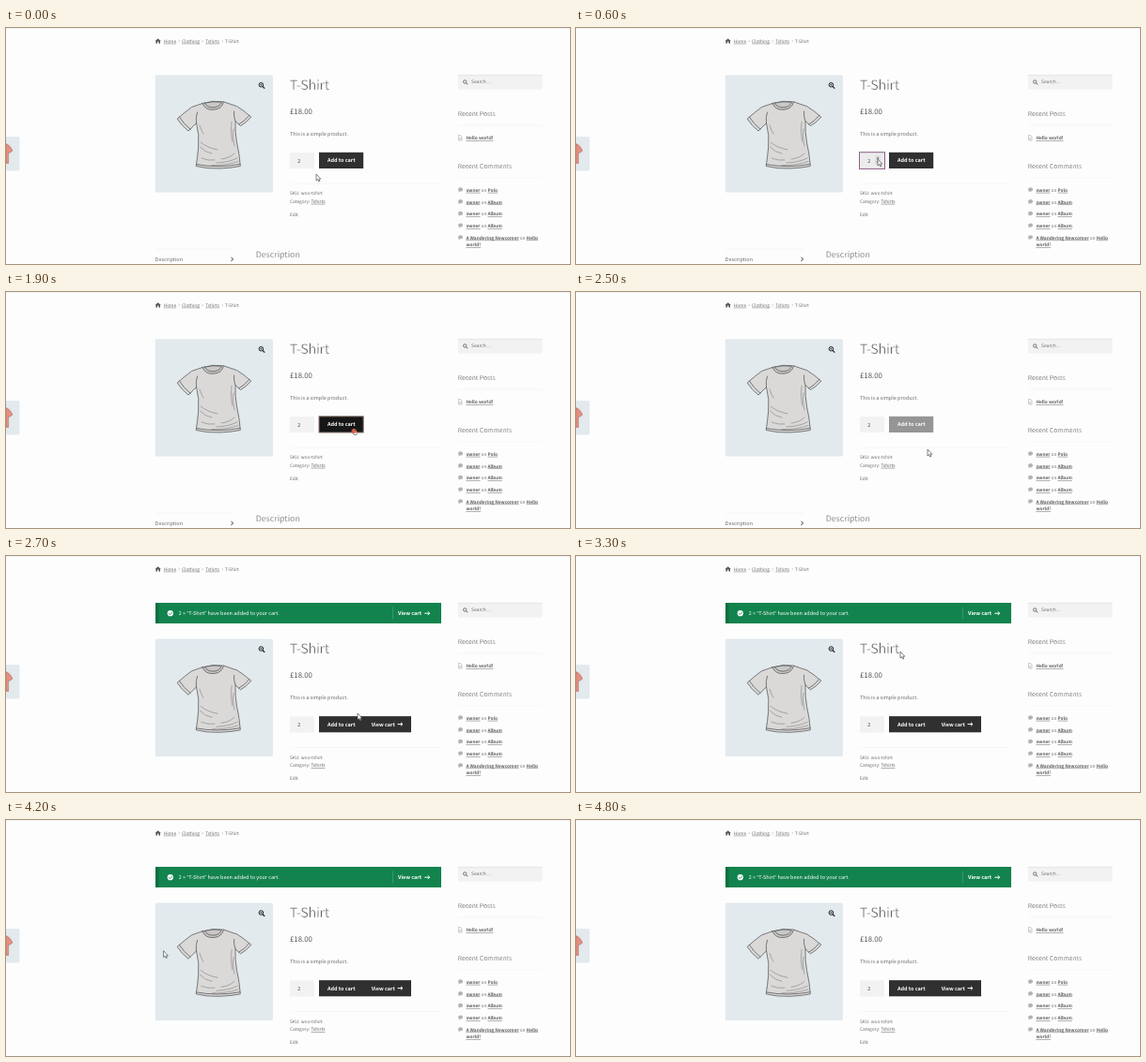
An HTML page that plays this animation: 600x252 px, repeating every 5 s.

```html
<!DOCTYPE html>
<html lang="en">
<head>
<meta charset="utf-8">
<title>Add to cart</title>
<style>
html, body { margin: 0; width: 100%; height: 100%; overflow: hidden; background: #fdfdfd; }
svg { display: block; width: 600px; height: 252px; }
text {
  font: 5.5px "Noto Sans CJK JP", "Noto Sans CJK SC", "Noto Sans CJK KR", "Noto Sans CJK", "Open Sans", sans-serif;
  fill: #6d6d6d; text-rendering: geometricPrecision; white-space: pre;
}
.small { font-size: 4.8px; }
/* a page-coloured outline thins the regular weight */
.light { fill: #555; stroke: #fdfdfd; stroke-width: .03em; }
.bold, .link { font-weight: 700; }
.white { fill: #fff; }
.link { fill: #5c5c5c; text-decoration: underline; }
.thin { font-weight: 400; }
.punct { font-family: Lato, "Open Sans", sans-serif; font-size: 5.3px; }
.rule { stroke: #f5f5f5; stroke-width: .8; }
.ink { fill: none; stroke: #555; stroke-width: .75; stroke-linecap: round; stroke-linejoin: round; }
.fold { stroke: #777; stroke-width: .55; }
</style>
</head>
<body>
<svg viewBox="0 0 600 252">
  <defs>
    <path id="bubble" d="M0 2.2C0-.7 5-.7 5 2.2C5 4 3 4.4 2 4.2L.6 5.2L.8 3.8Q0 3.2 0 2.2Z" fill="#b3b3b3"/>
    <path id="arrow" d="M0 0H5.4M3.5-1.8L5.4 0L3.5 1.8" fill="none" stroke="#fff"/>
  </defs>
  <rect width="600" height="252" fill="#fdfdfd"/>
  <rect width="600" height="1" fill="#f3f3f3"/>

  <!-- breadcrumbs -->
  <path d="M158.6 14L161.7 11.2L164.8 14H164V16.6H162.4V14.6H161V16.6H159.4V14Z" fill="#555"/>
  <text class="small" x="167.7" y="15.7" text-decoration="underline">Home</text>
  <text class="small" x="187" y="15.7" text-decoration="underline">Clothing</text>
  <text class="small" x="212.2" y="15.7" text-decoration="underline">Tshirts</text>
  <text class="small" x="233" y="15.7">T-Shirt</text>
  <path d="M183.6 12.7l1.2 1.3l-1.2 1.3M208.6 12.7l1.2 1.3l-1.2 1.3M229.6 12.7l1.2 1.3l-1.2 1.3" fill="none" stroke="#bbb" stroke-width=".6"/>

  <!-- neighbouring product -->
  <rect x="-10" y="116" width="24.5" height="36.5" rx="2" fill="#e2eaee"/>
  <path d="M0 123.5Q4 124.5 7 131L3.6 133.5L2.6 132.5V144.5H0Z" fill="#e58f80" stroke="#a8645b" stroke-width=".5"/>

  <!-- sidebar -->
  <rect x="481" y="50" width="89.5" height="15.5" fill="#f2f2f2"/>
  <path d="M481 50.4H570.5" stroke="#e4e4e4" stroke-width=".8"/>
  <circle cx="488.2" cy="57.4" r="1.7" fill="none" stroke="#555" stroke-width=".8"/>
  <path d="M489.5 58.7L491.2 60.4" stroke="#555"/>
  <text x="495" y="59.4" style="font-size:4.95px">Search ...</text>
  <text class="light" x="480.7" y="93.8" style="font-size:6.75px">Recent Posts</text>
  <path class="rule" d="M481 104H570.5M481 160H570.5"/>
  <path d="M481.4 114.5H483.6L485 116V120H481.4ZM482.3 117.2H484M482.3 118.5H484" fill="none" stroke="#aaa" stroke-width=".6"/>
  <text class="small link" x="489.4" y="119">Hello world!</text>
  <text class="light" x="480.7" y="149.8" style="font-size:6.75px">Recent Comments</text>
  <g id="comments"></g>
  <text class="small" x="489.4" y="225.6"><tspan class="link">A Wandering Newcomer</tspan> on <tspan class="link">Hello</tspan></text>
  <text class="small link" x="489.4" y="233">world!</text>

  <!-- notice -->
  <g id="notice">
    <rect x="159" y="50" width="304" height="22" fill="#13834e"/>
    <rect x="159" y="50" width="3.5" height="22" fill="#0f6f42"/>
    <circle cx="174.8" cy="61.2" r="3.1" fill="#fff"/>
    <path d="M173.2 61.2L174.4 62.4L176.5 60.2" fill="none" stroke="#13834e" stroke-width=".9"/>
    <text class="white" x="183.8" y="63.1">2 <tspan class="punct">×</tspan> <tspan class="punct">“</tspan>T-Shirt<tspan class="punct">”</tspan> have been added to your cart.</text>
    <path d="M411.5 54.5V67.5" stroke="#4aa077" stroke-width=".7"/>
    <text class="white bold" x="417" y="63.1">View cart</text>
    <use href="#arrow" x="445.3" y="61.2"/>
  </g>

  <!-- product -->
  <g id="product">
    <rect x="158.7" y="50.3" width="125.3" height="125.3" rx="1.5" fill="#e2eaee"/>
    <g class="ink">
      <path d="M209 80.5Q203 82.500 197.500 84.500Q190 90 182.200 97Q187 104.500 194 110L202.500 101.500Q206 114 204.600 128Q203.600 139 202.200 147.500Q214 150.500 227 150Q240 149.500 249.300 147.500Q248.500 135 245.500 122Q243.500 111 244 99.500L249.500 104.500Q256 101 260.800 95Q253 88 245.500 83.500Q239 81.500 231.500 78.800Q220 77 209 80.500Z" fill="#dad9d8"/>
      <path d="M209 80.5Q212 88 221 87.200Q230 86.500 231.500 78.800M211.200 80.200Q214 85.200 221 84.800Q227.500 84.300 229.400 79.200Q220 77.700 211.200 80.200Z" fill="#c9c8c7"/>
      <path d="M184.400 95Q189 102.500 196 108M247.700 102.800Q254 99.500 258.800 93.300M202.500 101.500Q201.500 95 203.500 90M244 99.500Q242 94 242.500 89M202.400 145.600Q226 150 249 145.400"/>
      <path class="fold" d="M207 122Q214 128 225 130M206.500 127Q212 133 219 134M229 140Q238 139 243 134M224 144Q237 143.500 246 139M219 146.500Q235 147 247 142.500M240 100Q238.500 110 240.500 121M242 108Q240.500 115 243 126M208 139Q215 142 222 141M206 104Q208 110 210 113"/>
    </g>
    <circle cx="271.4" cy="60.7" r="2.3" fill="none" stroke="#222"/>
    <path d="M273.1 62.4L275.2 64.6" stroke="#222" stroke-width="1.3"/>
    <path d="M270.2 60.7H272.6M271.4 59.5V61.9" stroke="#222" stroke-width=".6"/>

    <text class="light" x="301.8" y="65.6" style="font-size:14.3px;letter-spacing:-.02em">T-Shirt</text>
    <text x="302" y="91.8" style="font-size:7.8px;fill:#555">£18.00</text>
    <text x="302" y="115.1">This is a simple product.</text>

    <rect id="field" x="302" y="133" width="26" height="17.2" fill="#f2f2f2"/>
    <text id="qty" x="310.2" y="143.5" style="fill:#4c4c50">2</text>
    <g id="focus">
      <rect x="301.5" y="132.7" width="27" height="17.7" fill="none" stroke="#8d5f86"/>
      <path id="caret" d="M313.9 138.8V144.3" stroke="#555" stroke-width=".5"/>
      <rect x="318.3" y="136" width="5.5" height="10" fill="#dedede"/>
      <path d="M319.7 139.6L321 137.8L322.4 139.6ZM319.7 142.5L321 144.3L322.4 142.5Z" fill="#555"/>
    </g>

    <g id="button">
      <rect id="face" x="333" y="132.8" width="47.2" height="17.2"/>
      <text class="white bold" x="341.9" y="143.3">Add to cart</text>
    </g>
    <g id="view">
      <rect x="380" y="132.8" width="51" height="17.2" fill="#303030"/>
      <text class="white bold" x="388.7" y="143.3">View cart</text>
      <use href="#arrow" x="416.5" y="141.3"/>
    </g>

    <path class="rule" d="M302 166.3H463M159 236.3H242"/>
    <text class="small" x="302" y="178.3">SKU: woo-tshirt</text>
    <text class="small" x="302" y="186.8">Category: <tspan class="link thin">Tshirts</tspan></text>
    <text class="small" x="302" y="200.5">Edit</text>
    <text x="158.6" y="248.7">Description</text>
    <path d="M239.5 244.8L241.5 246.9L239.5 249" fill="none" stroke="#333"/>
    <text class="light" x="265.7" y="244.9" style="font-size:8.8px">Description</text>
  </g>

  <g id="cursor">
    <path id="pointer" d="M0 0V7L1.6 5.6L2.7 8L3.8 7.5L2.8 5.2H4.8Z" fill="#fff" stroke="#333" stroke-width=".6"/>
    <g id="hand">
      <path d="M.2 0V3.5L-1.2 3L1 6.5H4L4.7 3L1.5 2.2V0Z" fill="#fff" stroke="#333" stroke-width=".5"/>
      <circle id="click" cx="1.2" cy="2.6" r="2.7" fill="#df5b43" fill-opacity=".85"/>
    </g>
  </g>
</svg>
<script>
const el = id => document.getElementById(id);
const show = (id, on) => el(id).style.display = on ? "" : "none";

const rows = ["Polo", "Album", "Album", "Album"];
el("comments").innerHTML = rows.map((post, i) =>
  `<text class="small" x="489.4" y="${174.8 + i * 12.75}"><tspan class="link">owner</tspan> on <tspan class="link">${post}</tspan></text>`
).join("") + [0, 1, 2, 3, 4].map(i => `<use href="#bubble" x="481" y="${170.3 + i * 12.7}"/>`).join("");

// time, x, y of the mouse tip
const path = [
  [0, 330, 156], [500, 321, 140], [1200, 321, 139], [1400, 321, 139],
  [1800, 369, 146], [2000, 369, 146], [2300, 374, 168], [2800, 374, 168],
  [3300, 345, 102], [3800, 245, 116], [4000, 231.5, 136], [4600, -15, 150], [5000, -15, 150]
];

function mouseAt(t) {
  const i = path.findIndex(p => p[0] > t);
  const [t0, x0, y0] = path[i - 1], [t1, x1, y1] = path[i];
  const u = (t - t0) / (t1 - t0), k = u * u * (3 - 2 * u);
  return [x0 + (x1 - x0) * k, y0 + (y1 - y0) * k];
}

function draw(t) {
  const within = (a, b) => t >= a && t < b;
  const added = t >= 2700, editing = within(700, 1300), over = within(1700, 2100);

  show("notice", added);
  show("view", added);
  el("product").setAttribute("transform", `translate(0 ${added ? 38.3 : 0})`);

  show("focus", within(600, 1700));
  show("caret", editing);
  el("field").setAttribute("fill", within(600, 1700) ? "#ececec" : "#f2f2f2");
  el("qty").textContent = editing ? 1 : 2;

  const face = el("face"), pressed = within(1900, 2100);
  face.setAttribute("fill", over ? "#161616" : "#303030");
  face.setAttribute("stroke", pressed ? "#8b7770" : "none");
  el("button").setAttribute("opacity", within(2100, 2700) ? .5 : 1);

  el("cursor").setAttribute("transform", `translate(${mouseAt(t)})`);
  show("pointer", !over);
  show("hand", over);
  show("click", pressed);
}

function tick(now) {
  draw(Math.floor(now % 5000 / 100) * 100);
  requestAnimationFrame(tick);
}
draw(0);
requestAnimationFrame(tick);
</script>
</body>
</html>
```
